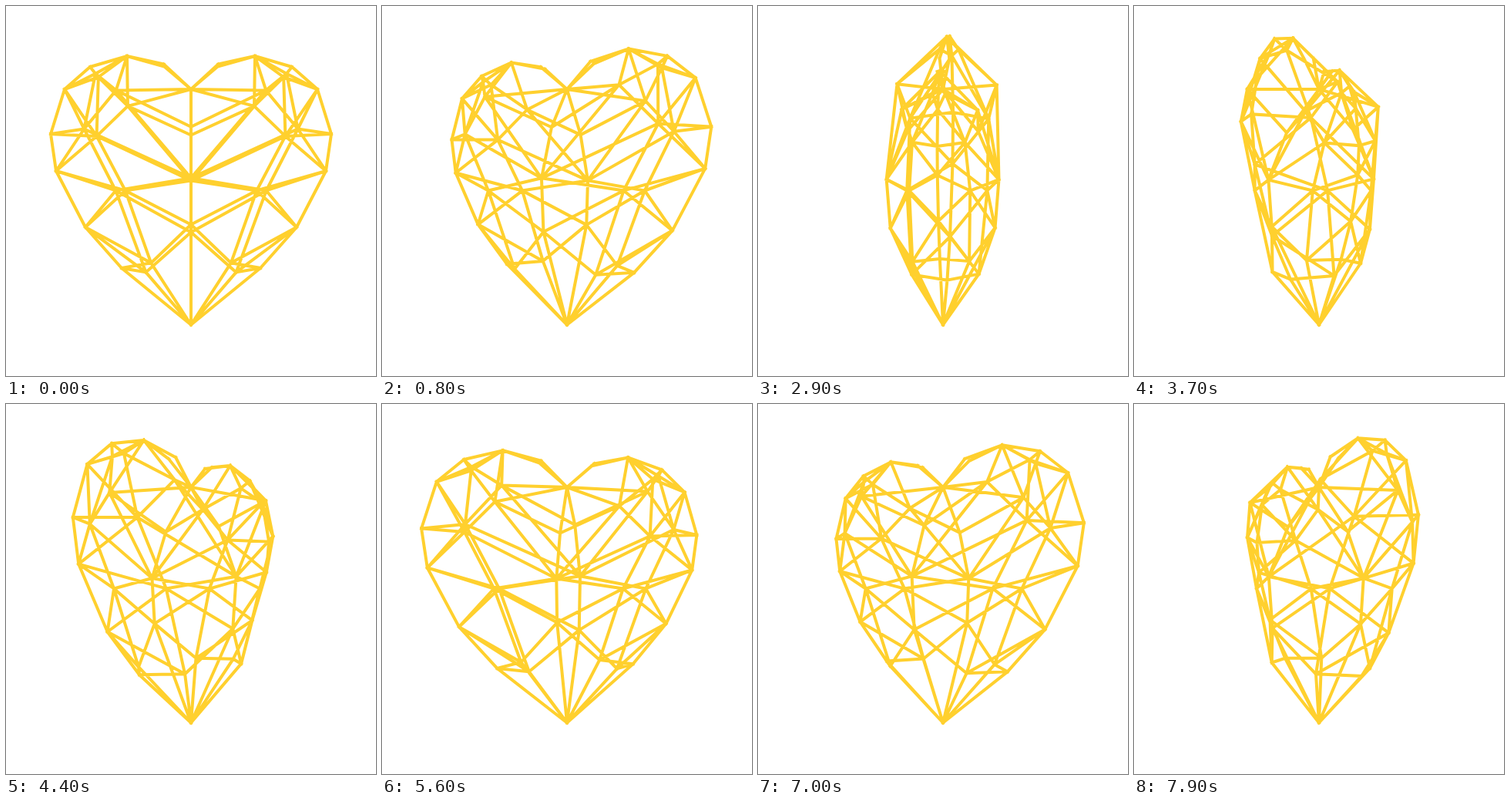
An HTML page with a canvas for the animation above (8000 ms loop, 480 by 480 pixels).

```html
<!DOCTYPE html>
<html lang="en">
<head>
<meta charset="utf-8">
<title>Turning wireframe heart</title>
<style>
  html, body { margin: 0; width: 100%; height: 100%; overflow: hidden; background: #fff; }
  canvas { display: block; width: 480px; height: 480px; }
</style>
</head>
<body>
<canvas id="stage" width="480" height="480"></canvas>
<script>
const ctx = document.getElementById('stage').getContext('2d');
const LOOP = 8000, STEP = 100, DEGREES_PER_STEP = 3;
const CENTER = 240, CAMERA = 660;

// One quarter of the heart; the rest is mirrored in x and z.
const points = {
  dip: [0, -132, 0],
  arch: [35, -163, 6],
  top: [83, -175, 0],
  shoulder: [131, -161, 0],
  crest: [122, -150, 10],
  side1: [164, -132, 0],
  side2: [182, -74, 0],
  side3: [175, -26, 0],
  side4: [137, 47, 0],
  side5: [90, 100, 0],
  tip: [0, 173.5, 0],
  brow: [89, -119.5, 56],
  cheek: [130, -75.5, 41],
  waist: [91, -0.5, 45],
  foot: [55, 99, 40],
  mid1: [0, -77.5, 46],
  mid2: [0, -15, 73],
  mid3: [0, 48, 68]
};

// Each row: a point, then the points it is joined to.
const edges = [
  'dip arch brow mid1',
  'top arch shoulder crest brow',
  'crest shoulder side1 brow cheek',
  'side1 shoulder side2 cheek',
  'side2 side3 cheek',
  'side3 side4 cheek waist',
  'side4 side5 waist foot',
  'side5 foot tip',
  'brow cheek mid1 mid2',
  'cheek waist mid2',
  'waist mid2 mid3 foot',
  'foot mid3 tip',
  'mid2 mid1 mid3',
  'mid3 tip'
].flatMap(row => {
  const [from, ...ends] = row.split(' ');
  return ends.map(to => [points[from], points[to]]);
});

function project([x, y, z], sx, sz, sin, cos) {
  const px = x * sx, pz = z * sz;
  const scale = CAMERA / (CAMERA - px * sin - pz * cos);
  return [CENTER + (px * cos - pz * sin) * scale, CENTER + y * scale];
}

function draw(time) {
  const step = Math.floor((time % LOOP) / STEP);
  const angle = step * DEGREES_PER_STEP * Math.PI / 180;
  const sin = Math.sin(angle), cos = Math.cos(angle);

  ctx.fillStyle = '#fff';
  ctx.fillRect(0, 0, 480, 480);
  ctx.strokeStyle = '#ffd02e';
  ctx.lineWidth = 4;
  ctx.lineCap = 'square';
  ctx.beginPath();
  for (const sx of [-1, 1]) {
    for (const sz of [-1, 1]) {
      for (const [a, b] of edges) {
        ctx.moveTo(...project(a, sx, sz, sin, cos));
        ctx.lineTo(...project(b, sx, sz, sin, cos));
      }
    }
  }
  ctx.stroke();
}

const start = performance.now();
function tick() {
  draw(performance.now() - start);
  requestAnimationFrame(tick);
}
tick();
</script>
</body>
</html>
```
